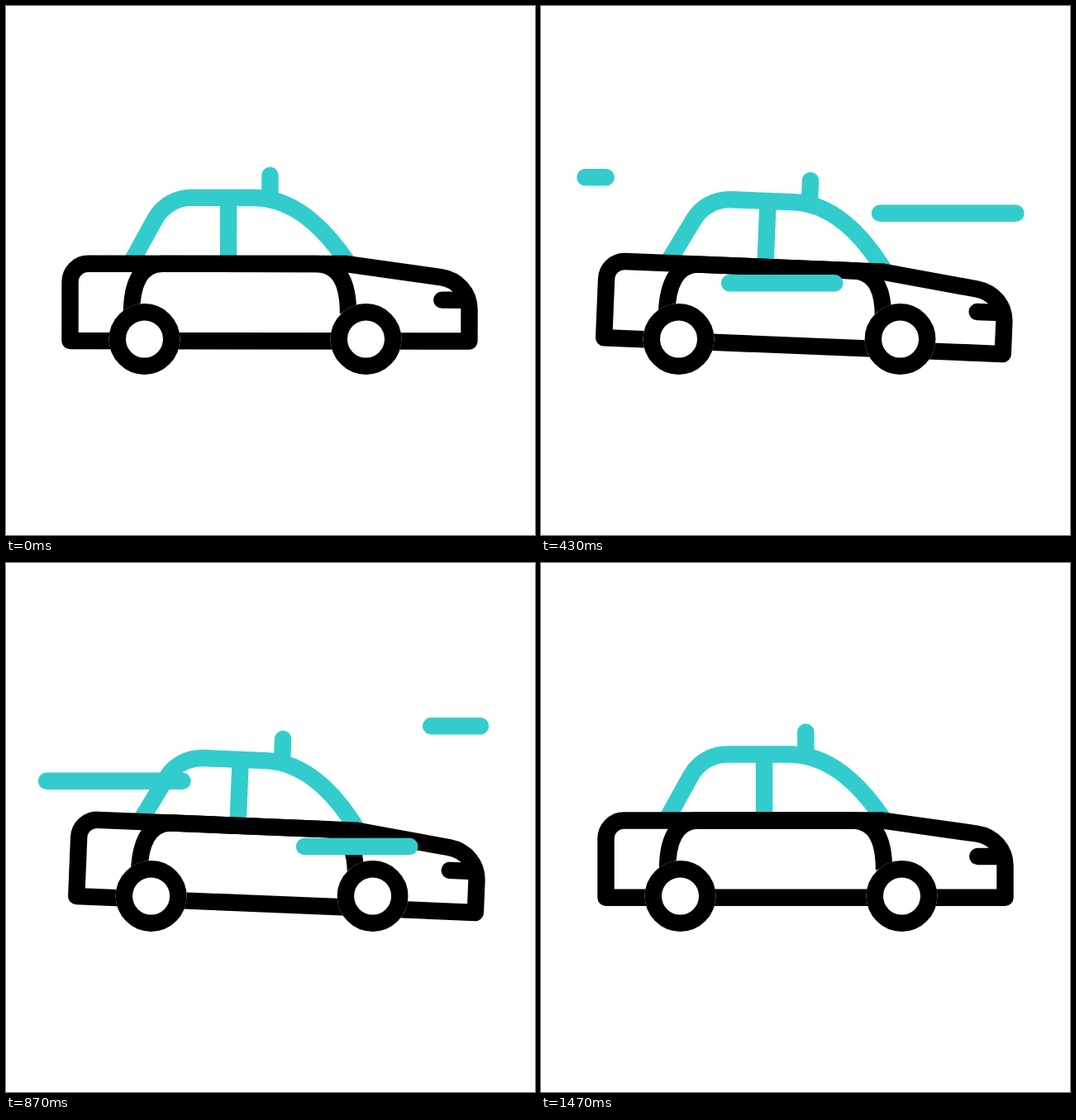
Recreate the animation shown at these times as an HTML page. Size 640x640 px, loop 1.67 s.

```html
<!DOCTYPE html>
<html lang="en">
<head>
<meta charset="utf-8">
<title>Car</title>
<style>
  html, body { margin: 0; width: 100%; height: 100%; overflow: hidden; background: #fff; }
  svg { display: block; width: 100vw; height: 100vh; }
  .line { fill: none; stroke: #000; stroke-width: 20.4; stroke-linejoin: round; }
  .teal { stroke: #33cccc; }
  .round { stroke-linecap: round; }
</style>
</head>
<body>
<svg viewBox="0 0 640 640">
  <g id="body">
    <g class="line teal">
      <path d="M151 311 L180.5 257.5 C189.5 241.5 206 232 225 232 H300 C343 232 380 261 413 310"/>
      <path d="M269 232 V308"/>
      <path class="round" d="M319.3 205 V229"/>
    </g>
    <g class="line">
      <path d="M77.5 405.3 V334 A22 22 0 0 1 99.5 312 H412 L526 328 C546 331 560.5 347 560.5 367 V405.3 Z"/>
      <path d="M152 372 C152 338 162 312 189 312 H375 C405 312 414 338 414 372"/>
      <path class="round" d="M527.3 355.5 H556"/>
    </g>
  </g>
  <g id="wheels">
    <circle cx="167.5" cy="403" r="43" fill="#fff"/>
    <circle cx="435.5" cy="403" r="43" fill="#fff"/>
    <circle class="line" cx="167.5" cy="403" r="32.7"/>
    <circle class="line" cx="435.5" cy="403" r="32.7"/>
  </g>
  <g id="streaks" class="line teal round"></g>
</svg>
<script>
const LOOP = 1670, LAST = 44, LENGTH = 200;
const $ = id => document.getElementById(id);

// Smooth rise from 0 to 1 between two ticks.
function step(tick, from, to) {
  const u = Math.min(1, Math.max(0, (tick - from) / (to - from)));
  return (1 - Math.cos(Math.PI * u)) / 2;
}

// 30 ticks per second, rounded to 10 ms; the car rests after the last one.
function tickAt(ms) {
  const part = ms % 100;
  const tick = Math.floor(ms / 100) * 3 + (part >= 30) + (part >= 70);
  return Math.min(tick, LAST);
}

function drawCar(tick) {
  const go = (from, to) => step(tick, from, to);
  const dx = 1 - 30.4 * go(-1, 7.5) + 69 * go(7.5, 19.9)
    - 66.3 * go(19.9, 32.5) + 27.7 * go(32.5, LAST);
  const dy = -0.5 + 17.5 * go(-1, 8.5) - 28.5 * go(8.5, 19)
    + 21.8 * go(19, 28) - 10.8 * go(28, LAST);
  const tilt = 2.35 * (go(-1, 9.5) - go(28, LAST));
  $("body").setAttribute("transform",
    `translate(${dx} ${dy}) rotate(${tilt} 319 392)`);
  $("wheels").setAttribute("transform", `translate(${dx} 0)`);
}

// A speed line grows leftwards from its right end, then its tail catches up.
function streak(right, y, start) {
  const el = document.createElementNS("http://www.w3.org/2000/svg", "path");
  $("streaks").appendChild(el);
  return tick => {
    const head = step(tick, start, start + 9.5);
    const tail = step(tick, start + 6.04, start + 14.44);
    const visible = head > 0 && tail < 1;
    el.setAttribute("d", visible
      ? `M${right - tail * LENGTH} ${y} H${right - head * LENGTH}` : "");
  };
}

const parts = [
  drawCar,
  streak(253.5, 207.2, 0.5),
  streak(428, 335.3, 3.5),
  streak(589, 250.8, 5.5),
  streak(561, 343, 16.5),
  streak(228, 263.7, 18.5),
  streak(574, 197.2, 22.5)
];

const begin = performance.now();
function loop() {
  const tick = tickAt((performance.now() - begin) % LOOP);
  parts.forEach(draw => draw(tick));
  requestAnimationFrame(loop);
}
loop();
</script>
</body>
</html>
```
